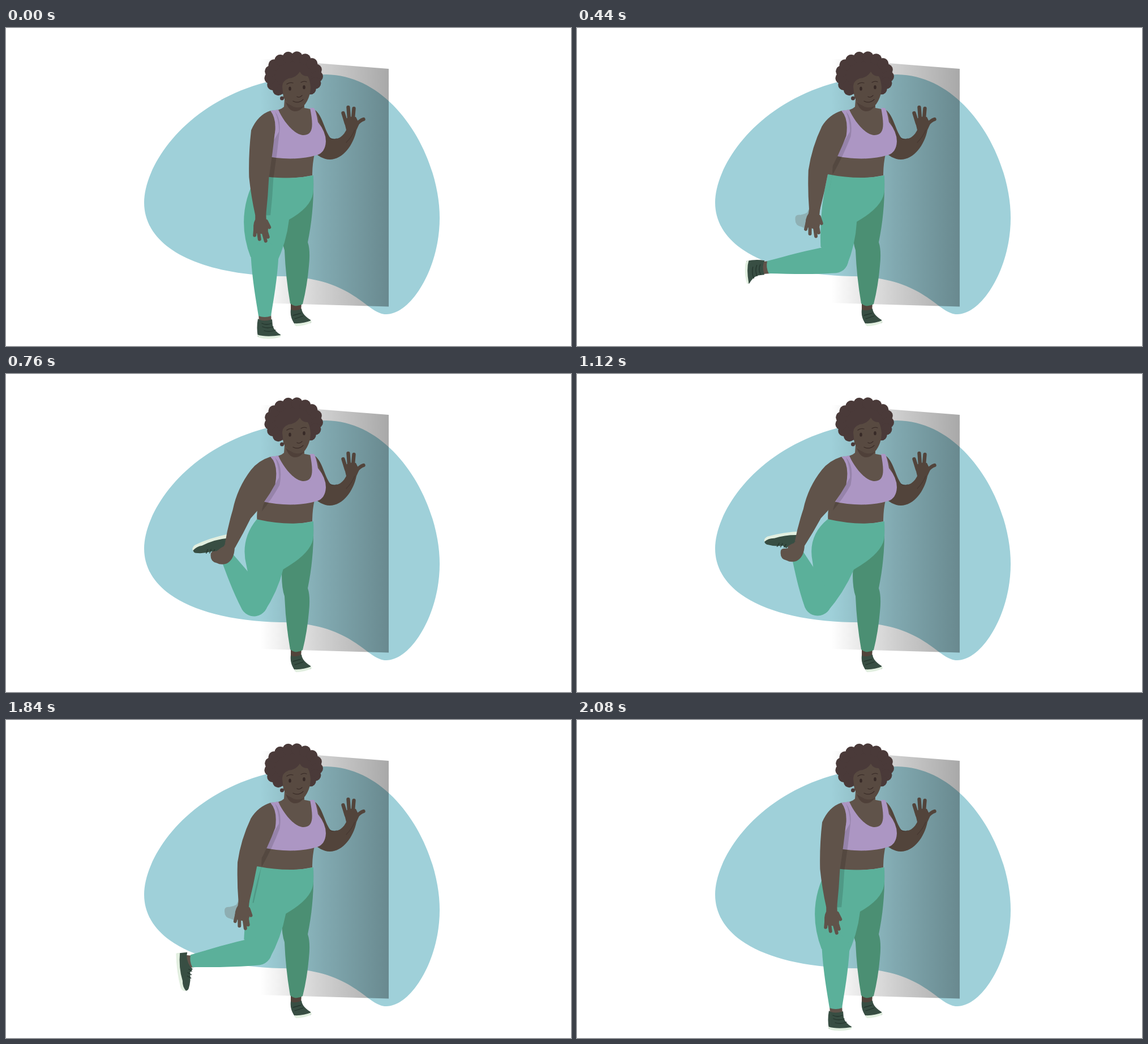
An HTML page that plays this animation: 998x561 px, repeating every 2.32 s.

```html
<!DOCTYPE html>
<html lang="en">
<head>
<meta charset="utf-8">
<title>Standing quad stretch</title>
<style>
  html, body { margin: 0; width: 100%; height: 100%; overflow: hidden; background: #fff; }
  svg { display: block; width: 100vw; height: 100vh; }
  .skin { fill: #60534a; }
  .far-skin { fill: #52443b; }
  .pants { fill: #5bb09a; }
  .shoe { fill: #384e43; }
  .sole { fill: #e2efe0; }
  .hair { fill: #4a3a39; }
  .line { fill: none; stroke: #3b2d29; stroke-width: 1.3; stroke-linecap: round; }
  .lace { fill: none; stroke: #24352d; stroke-width: 1.3; stroke-linecap: round; }
  .fingers { fill: none; stroke: #60534a; stroke-width: 6; stroke-linecap: round; }
  .far-fingers { fill: none; stroke: #52443b; stroke-width: 6.4; stroke-linecap: round; }
</style>
</head>
<body>
<svg viewBox="0 0 998 561" preserveAspectRatio="none">
  <defs>
    <linearGradient id="wallTone" gradientUnits="userSpaceOnUse" x1="449" y1="0" x2="676" y2="0">
      <stop offset="0" stop-opacity="0"/>
      <stop offset=".2" stop-opacity=".08"/>
      <stop offset=".5" stop-opacity=".19"/>
      <stop offset="1" stop-opacity=".34"/>
    </linearGradient>
    <clipPath id="bodyClip">
      <use href="#torso"/>
      <use href="#thigh"/>
    </clipPath>
  </defs>

  <path fill="#9fd0d9" d="M244 308C244 230 348 83 566 82C685 84 766 225 766 335C766 425 715 505 672 505C636 505 615 439 485 438C330 434 244 382 244 308Z"/>
  <path fill="url(#wallTone)" d="M449 54L676 72V491.500L449 485Z"/>

  <!-- far arm -->
  <path class="far-skin" d="M544 144C558 150 562 180 573 194C585 199 595 192 601 180L597 163Q606 154 618 157L624 169L619 180C614 206 595 232 572 232C560 232 550 224 546 221Z"/>
  <path class="far-fingers" d="M601 168L595.500 150M606 160L604.500 140M613 160L614.500 142M617 172Q625 163 631.500 161"/>
  <path class="line" opacity=".45" d="M572 194Q577 198 584 195M601 202Q611 192 616 180"/>

  <!-- far leg -->
  <path class="far-skin" d="M503 484H522L521 500H503Z"/>
  <path class="shoe" d="M503 496Q508 501 522 495Q523 506 538 515L539 520L511 524Q501 511 503 496Z"/>
  <path class="sole" d="M509 521Q524 522 539 516L540 519Q528 526 512 526Z"/>
  <path class="lace" d="M507 507L521 503M510 513L525 508"/>
  <path fill="#4b8f73" d="M543 262C544 300 541 340 533 378Q538 392 535 420Q532 455 524 487Q512 494 502 486Q494 440 492 392Q485 372 488 335Z"/>

  <path id="torso" class="skin" d="M492 126L491 139Q484 146 467 146Q475 165 474 182L449 224Q441 240 444 262Q500 269 541 260Q541 240 545 222L565 200L548 146Q535 142 527 141L527 128Z"/>
  <path fill="#4f4039" d="M494 130Q505 141 527 137Q520 147 510 147Q499 146 494 130Z"/>
  <path fill="#ac96c3" d="M467 146L481 144C488 161 508 189 526 189C543 188 543 172 537 141L544 141Q548 147 551 166Q565 183 565 200Q564 219 550 224Q505 237 449 224Q463 206 475 185Q477 163 467 146Z"/>

  <!-- head -->
  <g id="hair" class="hair"><ellipse cx="508" cy="84" rx="45" ry="36"/></g>
  <path fill="#584a41" d="M488 104C488 95 493 92 499 89Q512 88 519 77Q524 86 533 85Q537 92 538 104C538 118 533 128 528 135Q520 143 508 139Q495 133 490 122Z"/>
  <circle class="hair" cx="487.500" cy="124" r="3.500"/>
  <g fill="#372a27">
    <ellipse cx="501.500" cy="107" rx="2.300" ry="3.600"/>
    <ellipse cx="526.500" cy="104.500" rx="2.300" ry="3.600"/>
  </g>
  <path class="line" d="M496 99Q501 95 507 97M521 96Q526 93 531 95M514 121Q518 124 523 119M507 129Q517 134 525 126"/>

  <path id="thigh" class="pants"/>
  <g id="foot">
    <g id="frontFoot">
      <path class="skin" d="M-11 -5H11L12 11H-10Z"/>
      <path class="shoe" d="M-12 5Q-3 11 13 6L14 17Q17 27 28 33V36L-12 37Q-15 20 -12 5Z"/>
      <path class="sole" d="M-13 33Q2 38 28 34V37Q16 41 2 40Q-13 40 -13 33Z"/>
      <path class="lace" d="M-5 13Q3 17 12 13M-4 19Q5 23 15 19M-1 26Q8 29 19 25"/>
    </g>
    <g id="sideFoot">
      <path class="skin" d="M-9 -5H11L12 9H-11Z"/>
      <path class="shoe" d="M-16 6Q-4 10 10 2L14 -2L20 3Q34 2 48 7Q54 10 50 18L-15 23Z"/>
      <path class="sole" d="M-16 19Q10 23 34 17Q44 18 52 12Q53 18 46 21Q18 27 -15 26Z"/>
      <path class="lace" d="M14 5L18 0M20 7L24 1M26 8L30 2"/>
    </g>
  </g>
  <path id="shin" class="pants"/>

  <path id="shade" opacity=".13" clip-path="url(#bodyClip)" transform="translate(8 1)"/>
  <path id="fist" class="skin" d="M-9 -3L9 -2L8 8Q6 25 -6 31Q-16 34 -23 30Q-34 28 -34 17Q-35 8 -25 9Q-18 8 -13 5Z"/>
  <g id="hand">
    <path class="skin" d="M-9.500 -4H9.500L10 8Q15 14 13 28L8 34L-11 32Q-15 18 -9.500 8Z"/>
    <path class="fingers" d="M-9.500 24L-10.500 36M-4 28L-2 43M4 28L9 46M9 26L13 39M10 11L15.500 22"/>
  </g>
  <path id="arm" class="skin"/>
</svg>

<script>
const LOOP = 2320, STEP = 40, RAD = Math.PI / 180;
const $ = id => document.getElementById(id);
const draw = (id, d) => $(id).setAttribute('d', d);
const place = (id, [x, y], turn) => $(id).setAttribute('transform', `translate(${x} ${y}) rotate(${turn})`);

// Curls around the rim of the hair
const CURLS = 14;
for (let i = 0; i < CURLS; i++) {
  const a = (130 + 275 * i / (CURLS - 1)) * RAD;
  const curl = document.createElementNS('http://www.w3.org/2000/svg', 'circle');
  curl.setAttribute('cx', 508 + 42 * Math.cos(a));
  curl.setAttribute('cy', 84 + 33 * Math.sin(a));
  curl.setAttribute('r', 10);
  $('hair').append(curl);
}

const easeIn = p => p ** 1.3;
const easeOut = p => 1 - (1 - p) ** 1.5;
const smooth = p => p * p * (3 - 2 * p);
const linear = p => p;
const ramp = (t, a, b) => Math.min(1, Math.max(0, (t - a) / (b - a)));

// The whole pose follows from the bend (0 standing, 1 full stretch) and the knee
const keys = [
  { t: 0, bend: 0, kneeX: 457, ease: linear },
  { t: 160, bend: 0, kneeX: 457, ease: easeIn },
  { t: 440, bend: .53, kneeX: 455, ease: easeOut },
  { t: 760, bend: .95, kneeX: 438, ease: smooth },
  { t: 1120, bend: 1, kneeX: 425, ease: linear },
  { t: 1600, bend: 1, kneeX: 425, ease: linear },
  { t: 1640, bend: .975, kneeX: 425, ease: easeIn },
  { t: 1840, bend: .52, kneeX: 445, ease: easeOut },
  { t: 2080, bend: 0, kneeX: 457, ease: linear },
  { t: LOOP, bend: 0, kneeX: 457 }
];

function poseAt(t) {
  const i = keys.findIndex((k, n) => t < keys[n + 1].t);
  const a = keys[i], b = keys[i + 1];
  const p = a.ease((t - a.t) / (b.t - a.t));
  return [a.bend + (b.bend - a.bend) * p, a.kneeX + (b.kneeX - a.kneeX) * p];
}

// Point at a distance from `at`, angle clockwise from the right
const polar = ([x, y], angle, dist) => [x + Math.cos(angle * RAD) * dist, y + Math.sin(angle * RAD) * dist];

// Point beside `at`, square to the direction a -> b
function beside(at, a, b, dist) {
  const dx = b[0] - a[0], dy = b[1] - a[1], len = Math.hypot(dx, dy);
  return [at[0] - dy / len * dist, at[1] + dx / len * dist];
}

// Curve from a to b that bulges to one side
function bow(a, b, dist) {
  const mid = [(a[0] + b[0]) / 2, (a[1] + b[1]) / 2];
  return `Q${beside(mid, a, b, dist)} ${b}`;
}

function drawLeg(bend, kneeX, side) {
  const swing = Math.sin(Math.PI * bend), r = 24.5;
  const knee = [kneeX, 402 + 6 * swing];
  const waist = [443, 260 - 4 * bend];
  const back = [knee[0] - 25 + 16 * bend ** 6, knee[1] + 2 - 73 * bend ** 1.75];
  const crease = [500 - 11 * bend, 338 + 7 * bend];
  const front = beside(knee, crease, knee, -r);
  draw('thigh', `M543 260Q500 269 ${waist}${bow(waist, back, 34 - 20 * swing - 10 * bend)}` +
    `L${knee}L${front}${bow(front, crease, 7)}Q543 314 543 285Z`);

  const angle = 90 + 157 * bend, len = 106 - 14 * bend + 20 * swing;
  draw('shin', `M0 ${-r}C${len * .4} -22 ${len * .7} -16 ${len} -11Q${len + 4} 0 ${len} 11` +
    `C${len * .7} 16 ${len * .4} 22 0 ${r}A${r} ${r} 0 0 1 0 ${-r}Z`);
  place('shin', knee, angle);

  place('foot', polar(knee, angle, len + 14 * bend ** 5), 176 * bend ** 1.08);
  $('sideFoot').style.display = side ? '' : 'none';
  $('frontFoot').style.display = side ? 'none' : '';
}

function drawArm(bend, open, grip) {
  const shoulder = [454, 182];
  const foreAngle = 87.5 + 25 * bend ** 1.8;
  const elbow = polar(shoulder, 95 + 26 * bend ** .75, 82 - 7 * bend);
  const wrist = polar(elbow, foreAngle, 66 - 9 * bend ** 8);

  const pair = (at, a, b, w) => [beside(at, a, b, w), beside(at, a, b, -w)];
  const [sl, sr] = pair(shoulder, shoulder, elbow, 21 + 4 * bend);
  const [el, er] = pair(elbow, shoulder, wrist, 17.5);
  const [wl, wr] = pair(wrist, elbow, wrist, 9.5);
  const outline = `M467 146Q445 153 ${sl}${bow(sl, el, 3 + 6 * bend)}${bow(el, wl, 2)}L${wr}` +
    `${bow(wr, er, 1)}${bow(er, sr, 1 + 4 * bend)}Q${478 + 4 * bend} 160 467 146Z`;
  draw('arm', outline);
  draw('shade', outline);

  place('hand', wrist, foreAngle - 87.5);
  place('fist', wrist, 0);
  $('hand').style.opacity = open;
  $('fist').style.opacity = grip;
}

function render(now) {
  const t = Math.floor(now % LOOP / STEP) * STEP;
  const [bend, kneeX] = poseAt(t);
  drawLeg(bend, kneeX, t > 460 && t < 1900);
  drawArm(bend, 1 - ramp(t, 520, 640) + ramp(t, 1625, 1760), ramp(t, 410, 530) - ramp(t, 1760, 1870));
}

const start = performance.now();
function tick() {
  render(performance.now() - start);
  requestAnimationFrame(tick);
}
tick();
</script>
</body>
</html>
```
